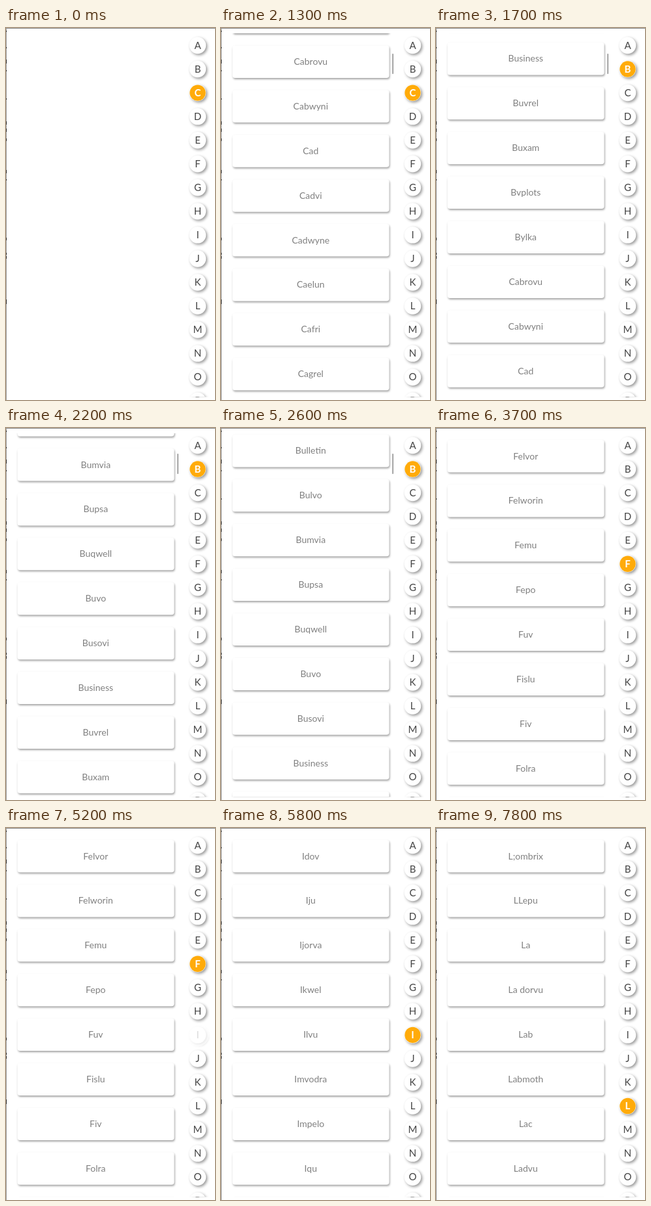
Write an HTML page with a canvas that moves like this. It is 320 px wide and 566 px high and loops after 8 s.

```html
<!DOCTYPE html>
<html lang="en">
<head>
<meta charset="utf-8">
<style>
  html, body { margin: 0; width: 100%; height: 100%; overflow: hidden; background: #fff; }
  canvas { display: block; }
</style>
</head>
<body>
<canvas id="stage" width="320" height="566"></canvas>
<script>
const ctx = document.getElementById('stage').getContext('2d');
const LOOP = 8000, STEP = 100;
const PITCH = 67.9, FIRST_TOP = 18;
const FAMILY = 'Lato, "Open Sans", sans-serif';

const words = text => text.split(',');
const bNames = words('Bukavo,Bulletin,Bulvo,Bumvia,Bupsa,Buqwell,Buvo,Busovi,Business,Buvrel,Buxam,Bvplots,Bylka');
const lists = {
  C: [...bNames, ...words('Cabrovu,Cabwyni,Cad,Cadvi,Cadwyne,Caelun,Cafri,Cagrel,Cahup')],
  F: words('Felvor,Felworin,Femu,Fepo,Fuv,Fislu,Fiv,Folra,Fomvi'),
  I: words('Idov,Iju,Ijorva,Ikwel,Ilvu,Imvodra,Impelo,Iqu,Irvo'),
  L: words('L;ombrix,LLepu,La,La dorvu,Lab,Labmoth,Lac,Ladvu,Lafro')
};

// Each tap fades its letter, empties the list on release, then shows the new list.
const jumps = [
  { letter: 'C', press: -200, release: -200, show: 100 },
  { letter: 'F', press: 3200, release: 3300, show: 3600 },
  { letter: 'I', press: 5200, release: 5300, show: 5700 },
  { letter: 'L', press: 7100, release: 7400, show: 7800 }
];

// A short accelerating drag, then a fling that decays exponentially.
function scrollOffset(t) {
  if (t < 1200) return 0;
  if (t < 1500) return 76 * ((t - 1200) / 300) ** 2;
  return 904 - 560.6 * Math.exp(-(t - 1700) / 514);
}

function letterOpacity(letter, t) {
  const jump = jumps.find(j => j.letter === letter);
  if (!jump || t < jump.press) return 1;
  if (t < jump.release) return 0.2;
  return Math.min(1, 0.4 + (t - jump.release) / 200 * 0.6);
}

function setShadow(color, x, y, blur) {
  ctx.shadowColor = color;
  ctx.shadowOffsetX = x;
  ctx.shadowOffsetY = y;
  ctx.shadowBlur = blur;
}

function label(text, x, baseline, color, font) {
  ctx.font = `${font} ${FAMILY}`;
  ctx.fillStyle = color;
  ctx.fillText(text, x, baseline);
}

function disc(y, radius, color) {
  ctx.fillStyle = color;
  ctx.beginPath();
  ctx.arc(293.5, y, radius, 0, Math.PI * 2);
  ctx.fill();
}

function card(name, top) {
  if (top < -60 || top > 566) return;
  ctx.save();
  setShadow('rgba(0,0,0,.36)', 1, 2, 3);
  ctx.fillStyle = '#fff';
  ctx.beginPath();
  ctx.roundRect(17.5, top, 240, 49.5, 4);
  ctx.fill();
  ctx.restore();
  label(name, 137.3, top + 29.5, '#808080', '14px');
}

function letterButton(letter, y, active, opacity) {
  ctx.save();
  setShadow('rgba(0,0,0,.42)', 2, 2, 4);
  disc(y, 12.7, '#fff');
  setShadow('transparent', 0, 0, 0);
  if (active) disc(y, 12.2, '#ffab0a');
  label(letter, 293.5, y + 5, active ? '#fff' : '#444', active ? 'bold 15px' : '15px');
  // Fading the whole button over white equals a white veil on top.
  disc(y, 17.5, `rgba(255,255,255,${1 - opacity})`);
  ctx.restore();
}

function windowEdge() {
  ctx.fillStyle = '#888';
  ctx.fillRect(0, 0, 320, 1);
  ctx.fillStyle = '#999';
  ctx.fillRect(0, 0, 1, 566);
  ctx.fillStyle = '#222';
  for (const [y, h] of [[4, 2], [29, 2], [48, 6], [64, 2], [107, 2], [142, 5], [153, 5],
                        [168, 4], [216, 5], [230, 2], [319, 4], [342, 3], [347, 4], [413, 7]])
    ctx.fillRect(0, y, 1, h);
}

function draw(t) {
  const jump = jumps.findLast(j => t >= j.release);
  const offset = jump.letter === 'C' ? scrollOffset(t) : 0;
  const active = offset > 20 ? 'B' : jump.letter;

  ctx.fillStyle = '#fff';
  ctx.fillRect(0, 0, 320, 566);
  ctx.textAlign = 'center';

  ctx.save();
  ctx.beginPath();
  ctx.rect(0, 8, 320, 553.5);
  ctx.clip();
  if (t >= jump.show) {
    const hidden = jump.letter === 'C' ? bNames.length : 0;
    lists[jump.letter].forEach((name, i) => card(name, FIRST_TOP + (i - hidden) * PITCH + offset));
  }
  if (offset > 0) {
    ctx.fillStyle = '#aaa';
    ctx.beginPath();
    ctx.roundRect(262, 39, 2.2, 31, 1);
    ctx.fill();
  }
  [...'ABCDEFGHIJKLMNOP'].forEach((letter, i) =>
    letterButton(letter, 26.5 + i * 36.05, letter === active, letterOpacity(letter, t)));
  ctx.restore();

  windowEdge();
}

function frame() {
  const t = performance.now() % LOOP;
  draw(Math.floor(t / STEP) * STEP);
  requestAnimationFrame(frame);
}
frame();
</script>
</body>
</html>
```
